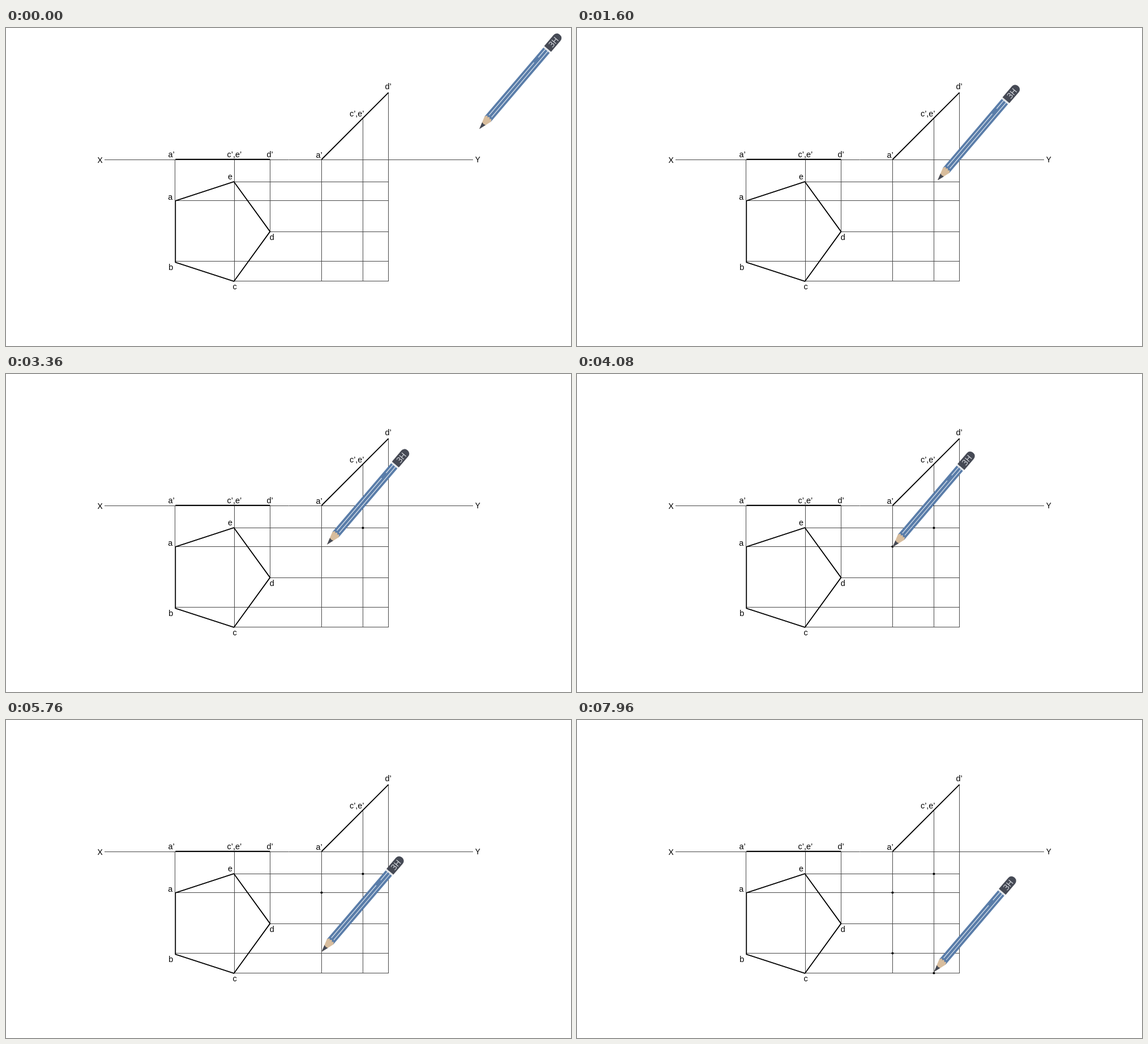
An HTML page with a canvas that plays this animation: 998 px wide and 561 px high, repeating every 8000 ms.

```html
<!DOCTYPE html>
<html lang="en">
<head>
<meta charset="utf-8">
<title>Pentagon projection</title>
<style>
  html, body { margin: 0; width: 100%; height: 100%; overflow: hidden; background: #fff; }
  canvas { display: block; width: 998px; height: 561px; }
</style>
</head>
<body>
<canvas id="stage" width="998" height="561"></canvas>
<script>
const ctx = document.getElementById('stage').getContext('2d');
const LOOP = 8000, STEP = 40;
const LABEL = '14.4px "Liberation Sans", Arial, sans-serif';
const AXIS_FONT = '13.5px Lato, sans-serif';
const INK = '#000', THIN = '#484848', BLUE = '#5a7da9', CAP = '#464a55', STRIPE = '#e9eff5';

// Regular pentagon in plan, seen edge-on on the axis, then tilted 45 degrees about a'.
const AXIS = 232, CENTER = [374, 359.1], RADIUS = 92.4;
const [d, c, b, a, e] = [0, 1, 2, 3, 4].map(i => {
  const angle = i * 2 * Math.PI / 5;
  return { x: CENTER[0] + RADIUS * Math.cos(angle), y: CENTER[1] + RADIUS * Math.sin(angle) };
});
const rise = p => (p.x - a.x) * Math.SQRT1_2;
const tiltX = p => 557.4 + rise(p);
const tiltY = p => AXIS - rise(p);

const crisp = v => Math.floor(v) + 0.5;
const row = p => crisp(p === b ? p.y - 2 : Math.min(p.y + 0.2, 446.4));

// The pencil visits each plotted point in turn; `dy` is how far it stops from the dot.
const START = { x: 836, y: 178.3 };
const FIRST_STOP = 1785, PERIOD = 1930, DOT_DELAY = 180;
const VISITS = [[e, 0.3], [a, 1], [b, -2.4], [c, -2]].map(([p, dy], i) => ({
  x: tiltX(p), y: row(p), dy, stop: FIRST_STOP + i * PERIOD, span: i ? 1500 : 1630
}));

const ease = p => (1 - Math.cos(Math.PI * Math.min(1, Math.max(0, p)))) / 2;

function line(x1, y1, x2, y2, width = 1, color = THIN) {
  ctx.lineWidth = width;
  ctx.strokeStyle = color;
  ctx.beginPath();
  ctx.moveTo(x1, y1);
  ctx.lineTo(x2, y2);
  ctx.stroke();
}

function text(str, x, y, font = LABEL) {
  ctx.font = font;
  ctx.fillText(str, x, y);
}

function drawGrid() {
  const right = tiltX(d), bottom = row(c);
  line(174, AXIS + 0.5, 825, AXIS + 0.5);
  for (const [p, foot] of [[a, a], [e, c], [d, d]]) {
    const x = crisp(p.x - 0.3 + (p === e));
    line(x, AXIS, x, row(foot));
    line(crisp(tiltX(p)), tiltY(p), crisp(tiltX(p)), bottom);
  }
  for (const p of [a, b, c, d, e]) line(p.x, row(p), right + 0.5, row(p));
}

function drawViews() {
  line(a.x, AXIS - 0.2, d.x, AXIS - 0.2, 1.9, INK);
  line(tiltX(a), tiltY(a), tiltX(d), tiltY(d), 1.8, INK);
  ctx.lineWidth = 1.8;
  ctx.lineJoin = 'round';
  ctx.beginPath();
  for (const p of [a, b, c, d, e]) ctx.lineTo(p.x, p.y);
  ctx.closePath();
  ctx.stroke();
}

function drawLabels() {
  ctx.fillStyle = INK;
  ctx.textAlign = 'left';
  text('X', 161.8, AXIS + 5.6, AXIS_FONT);
  text('Y', 829, AXIS + 5.4, AXIS_FONT);

  text('a', a.x - 13, a.y - 1.5);
  text('b', b.x - 12, b.y + 14);
  text('c', c.x - 2, c.y + 14.5);
  text('d', d.x - 0.6, d.y + 14.8);
  text('e', e.x - 10.6, e.y - 3.8);

  text('a’', a.x - 12.8, AXIS - 4.5);
  text('c’,e’', e.x - 12, AXIS - 4.5);
  text('d’', d.x - 6, AXIS - 4.5);

  text('a’', tiltX(a) - 10, tiltY(a) - 3.5);
  text('c’,e’', tiltX(e) - 23.5, tiltY(e) - 2.5);
  text('d’', tiltX(d) - 6, tiltY(d) - 5.8);
}

function drawDot({ x, y }) {
  ctx.fillStyle = INK;
  ctx.beginPath();
  ctx.arc(x, y, 2.1, 0, 2 * Math.PI);
  ctx.fill();
}

// Drawn along +x with the tip at the local origin.
function drawPencil({ x, y }) {
  const half = 7.3, wood = 23, collar = 183, end = 219, stripe = 2.8;
  ctx.save();
  ctx.translate(x, y);
  ctx.rotate(-49.5 * Math.PI / 180);

  ctx.fillStyle = BLUE;
  ctx.fillRect(wood, -half, collar - wood, 2 * half);

  // Sharpened cone with one scallop per face.
  ctx.fillStyle = '#d8bd9d';
  ctx.beginPath();
  ctx.moveTo(0, 0);
  ctx.lineTo(wood, -half);
  for (let i = 0; i < 3; i++) {
    const top = -half + i * 2 * half / 3;
    ctx.quadraticCurveTo(wood + 7, top + half / 3, wood + (i < 2 ? 2 : 0), top + 2 * half / 3);
  }
  ctx.fill();

  ctx.fillStyle = CAP;
  ctx.beginPath();
  ctx.moveTo(0, 0);
  ctx.lineTo(12.5, -3.9);
  ctx.lineTo(11.5, 0);
  ctx.lineTo(12.5, 3.9);
  ctx.fill();

  line(wood + 7, -stripe, 152, -stripe, 1.1, STRIPE);
  line(164, -stripe, collar, -stripe, 1.1, STRIPE);
  line(wood + 7, stripe, collar, stripe, 1.1, STRIPE);

  ctx.fillStyle = '#e4e7ea';
  ctx.fillRect(collar, -half - 0.3, 3, 2 * half + 0.6);
  ctx.fillStyle = CAP;
  ctx.beginPath();
  ctx.roundRect(collar + 3, -half - 0.7, end - collar - 3, 2 * half + 1.4, [0, 7.4, 7.4, 0]);
  ctx.fill();

  ctx.fillStyle = '#dfe2e7';
  ctx.textAlign = 'center';
  text('3H', 202, 5.1, '14px "Open Sans", sans-serif');
  ctx.restore();
}

function tipAt(t) {
  let { x, y } = START;
  for (const v of VISITS) {
    const k = ease(1 - (v.stop - t) / v.span);
    x += (v.x - x) * k;
    y += (v.y + v.dy - y) * k;
  }
  return { x, y };
}

function render(now) {
  const t = Math.floor((now % LOOP) / STEP) * STEP;
  ctx.fillStyle = '#fff';
  ctx.fillRect(0, 0, 998, 561);
  drawGrid();
  drawViews();
  drawLabels();
  VISITS.filter(v => t >= v.stop + DOT_DELAY).forEach(drawDot);
  drawPencil(tipAt(t));
}

const origin = performance.now();
function loop() {
  render(performance.now() - origin);
  requestAnimationFrame(loop);
}
loop();
</script>
</body>
</html>
```
